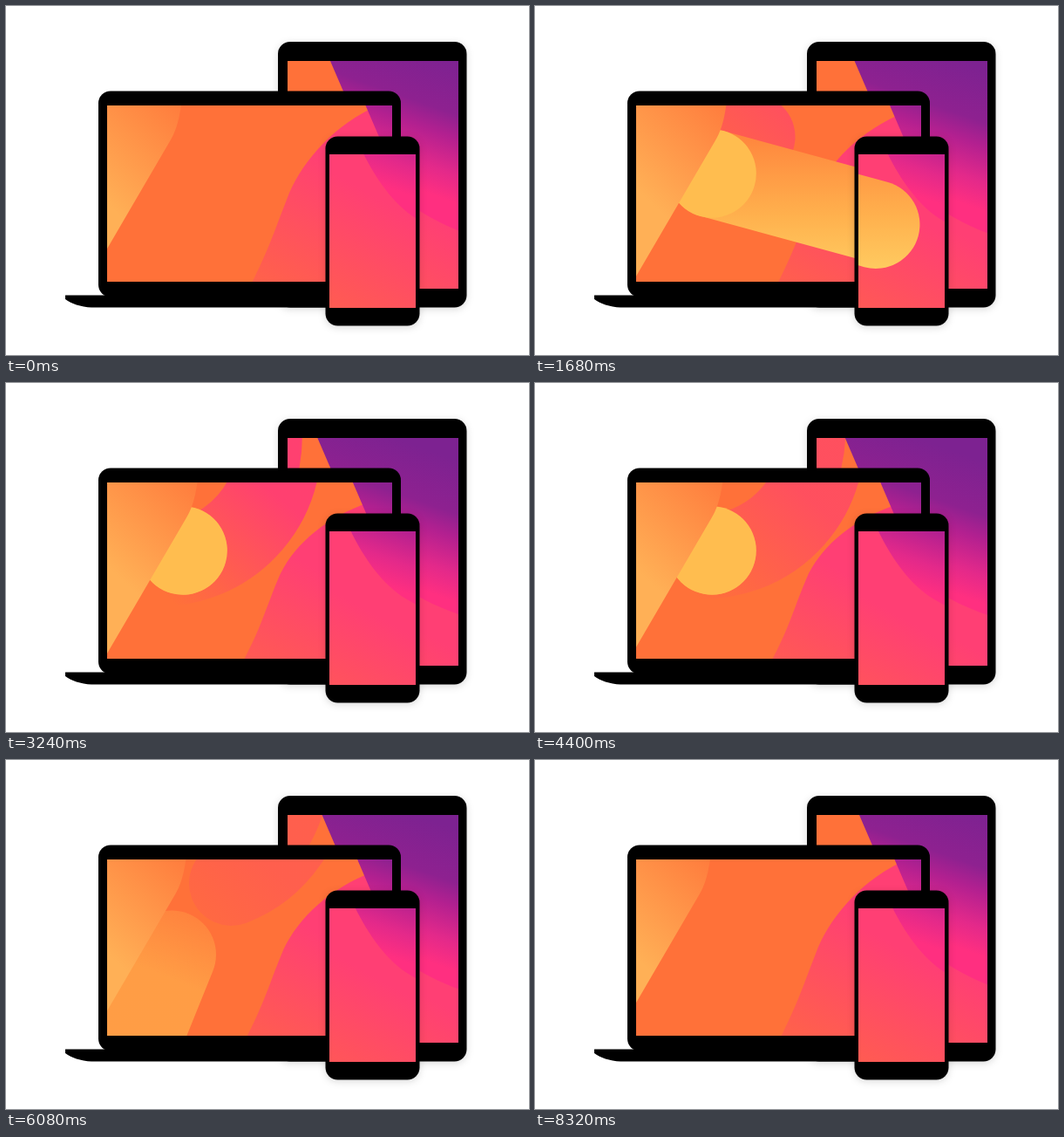
Animation, 600 px wide and 400 px high, one loop 8360 ms. Source, as an HTML page without scripts:

```html
<!DOCTYPE html>
<html lang="en">
<head>
<meta charset="utf-8">
<title>Devices</title>
<style>
  html, body { margin: 0; width: 100%; height: 100%; overflow: hidden; background: #fff; }
  svg { display: block; width: 600px; height: 400px; }
  .lift { filter: drop-shadow(0 2px 4px rgba(0, 0, 0, .15)); }
</style>
</head>
<body>
<svg viewBox="0 0 600 400">
  <defs>
    <linearGradient id="sand" gradientUnits="userSpaceOnUse" x1="207" y1="112" x2="108" y2="220">
      <stop stop-color="#ff7a3c"/>
      <stop offset="1" stop-color="#ffb056"/>
    </linearGradient>
    <linearGradient id="rose" gradientUnits="userSpaceOnUse" x1="300" y1="370" x2="400" y2="190">
      <stop stop-color="#ff6a40"/>
      <stop offset="1" stop-color="#ff3f74"/>
      <animateTransform attributeName="gradientTransform" type="translate" dur="8.36s" repeatCount="indefinite"
        values="0 0;-14 45;0 0" keyTimes="0;.5;1" calcMode="spline" keySplines=".42 0 .58 1;.42 0 .58 1"/>
    </linearGradient>
    <linearGradient id="plum" gradientUnits="userSpaceOnUse" x1="541" y1="71" x2="490" y2="217">
      <stop stop-color="#7d2291"/>
      <stop offset=".38" stop-color="#8e2190"/>
      <stop offset=".55" stop-color="#b32090"/>
      <stop offset=".8" stop-color="#e3298a"/>
      <stop offset="1" stop-color="#ff2f80"/>
      <animateTransform attributeName="gradientTransform" type="translate" dur="8.36s" repeatCount="indefinite"
        values="0 0;0 20;0 0" keyTimes="0;.5;1" calcMode="spline" keySplines=".42 0 .58 1;.42 0 .58 1"/>
    </linearGradient>
    <linearGradient id="blush" gradientUnits="userSpaceOnUse" x1="190" y1="250" x2="300" y2="120">
      <stop stop-color="#ff4070" stop-opacity="0"/>
      <stop offset="1" stop-color="#ff4070"/>
    </linearGradient>
    <linearGradient id="beam" gradientUnits="userSpaceOnUse" x1="-13.6" y1="-50" x2="33.6" y2="123.5">
      <stop stop-color="#ff823c"/>
      <stop offset=".55" stop-color="#ffb04d"/>
      <stop offset="1" stop-color="#ffd265"/>
    </linearGradient>
    <linearGradient id="wake" gradientUnits="userSpaceOnUse" x1="-60" y1="0" x2="60" y2="0">
      <stop stop-color="#ffbd4f" stop-opacity=".08"/>
      <stop offset="1" stop-color="#ffbd4f" stop-opacity=".85"/>
    </linearGradient>

    <clipPath id="tabletScreen"><path d="M323 63h196v261H323z"/></clipPath>
    <clipPath id="laptopScreen"><path d="M116 114h327v202H116z"/></clipPath>
    <clipPath id="phoneScreen"><path d="M371 170h99v176h-99z"/></clipPath>

    <g id="scene">
      <path d="M0-50H700V450H0z" fill="#ff7139"/>

      <!-- pink arc sweeping up and out at the top -->
      <path fill="none" stroke="url(#blush)" stroke-width="97" stroke-linecap="round" d="M10 240A300 300 0 0 0 95 215">
        <animate attributeName="d" dur="8.36s" repeatCount="indefinite" keyTimes="0;.11;.201;.388;.641;.837;1"
          values="M10 240A300 300 0 0 0 95 215;
                  M90 210A300 300 0 0 0 186 179;
                  M130 200A250 250 0 0 0 250 150;
                  M150 205A137 137 0 0 0 305 23;
                  M210 193A135 135 0 0 0 345 45;
                  M320 76A135 135 0 0 0 345 -20;
                  M335 10A135 135 0 0 0 350 -60"/>
        <animate attributeName="opacity" dur="8.36s" repeatCount="indefinite"
          keyTimes="0;.11;.201;.388;.641;.837;1" values=".6;.75;.7;1;.42;.3;.2"/>
      </path>

      <!-- right wave -->
      <path fill="url(#rose)" d="M265 350C300 285 305 265 322 222C336 184 370 142 418 118L700 60V450H265z">
        <animate attributeName="d" dur="8.36s" repeatCount="indefinite" keyTimes="0;.5;1"
          calcMode="spline" keySplines=".42 0 .58 1;.42 0 .58 1"
          values="M265 350C300 285 305 265 322 222C336 184 370 142 418 118L700 60V450H265z;
                  M253 350C290 290 295 262 311 225C326 190 360 160 408 142L700 80V450H253z;
                  M265 350C300 285 305 265 322 222C336 184 370 142 418 118L700 60V450H265z"/>
      </path>

      <!-- sun arriving from the right -->
      <g transform="translate(203 192) rotate(15.2)">
        <animate attributeName="opacity" dur="8.36s" repeatCount="indefinite" calcMode="discrete" keyTimes="0;.5" values="1;0"/>
        <line x1="620" x2="620.01" y1="0" y2="0" stroke="url(#beam)" stroke-width="101" stroke-linecap="round">
          <animate attributeName="x1" dur="8.36s" repeatCount="indefinite" values="620;0;0" keyTimes="0;.2;1"
            calcMode="spline" keySplines=".25 .1 .25 1;0 0 1 1"/>
          <animate attributeName="x2" dur="8.36s" repeatCount="indefinite" values="620;453;223;0;0" keyTimes="0;.11;.201;.299;1"
            calcMode="spline" keySplines="0 0 1 1;0 0 1 1;.2 .3 .6 1;0 0 1 1"/>
        </line>
        <circle cx="620" r="50.8" fill="#ffbd4f">
          <animate attributeName="cx" dur="8.36s" repeatCount="indefinite" values="620;0;0" keyTimes="0;.2;1"
            calcMode="spline" keySplines=".25 .1 .25 1;0 0 1 1"/>
        </circle>
      </g>

      <!-- sun setting to the lower left -->
      <g transform="translate(203 192) rotate(112)" opacity="0">
        <animate attributeName="opacity" dur="8.36s" repeatCount="indefinite" calcMode="discrete" keyTimes="0;.5" values="0;1"/>
        <line x1="0" x2="0.01" y1="0" y2="0" stroke="url(#wake)" stroke-width="101" stroke-linecap="round">
          <animate attributeName="x1" dur="8.36s" repeatCount="indefinite" values="0;0;268;268" keyTimes="0;.55;.825;1"
            calcMode="spline" keySplines="0 0 1 1;.42 0 .58 1;0 0 1 1"/>
          <animate attributeName="x2" dur="8.36s" repeatCount="indefinite" values="0;0;200;200" keyTimes="0;.646;.933;1"
            calcMode="spline" keySplines="0 0 1 1;.42 0 .58 1;0 0 1 1"/>
          <animate attributeName="opacity" dur="8.36s" repeatCount="indefinite" values="1;1;.25;0;0" keyTimes="0;.646;.837;.95;1"/>
        </line>
        <circle r="50.8" fill="#ffbd4f">
          <animate attributeName="cx" dur="8.36s" repeatCount="indefinite" values="0;0;268;268" keyTimes="0;.55;.825;1"
            calcMode="spline" keySplines="0 0 1 1;.42 0 .58 1;0 0 1 1"/>
        </circle>
      </g>

      <!-- left wave -->
      <path fill="url(#sand)" d="M205 60C203 120 197 140 188 155L60 374V450H-50V60z">
        <animateTransform attributeName="transform" type="translate" dur="8.36s" repeatCount="indefinite"
          values="0 0;20 0;0 0" keyTimes="0;.25;1" calcMode="spline" keySplines=".42 0 .58 1;.42 0 .58 1"/>
      </path>

      <!-- purple corner -->
      <path fill="url(#plum)" d="M342-50L394 71L428 150C441 180 465 225 500 245C520 257 540 266 560 272L740 310V-50z">
        <animateTransform attributeName="transform" type="translate" dur="8.36s" repeatCount="indefinite"
          values="0 0;-15 3;0 0" keyTimes="0;.5;1" calcMode="spline" keySplines=".42 0 .58 1;.42 0 .58 1"/>
      </path>
    </g>
  </defs>

  <rect class="lift" x="312" y="41" width="216.5" height="304.5" rx="14"/>
  <g clip-path="url(#tabletScreen)"><use href="#scene" x="-22" y="-8"/></g>

  <rect x="106" y="97.5" width="347" height="236" rx="14"/>
  <path d="M68 331.5H420V345.500H98C86 345 74 341 68 336z"/>
  <g clip-path="url(#laptopScreen)"><use href="#scene"/></g>

  <rect class="lift" x="366.500" y="149.500" width="108" height="217" rx="14"/>
  <g clip-path="url(#phoneScreen)"><use href="#scene" x="-27"/></g>
</svg>
</body>
</html>
```
